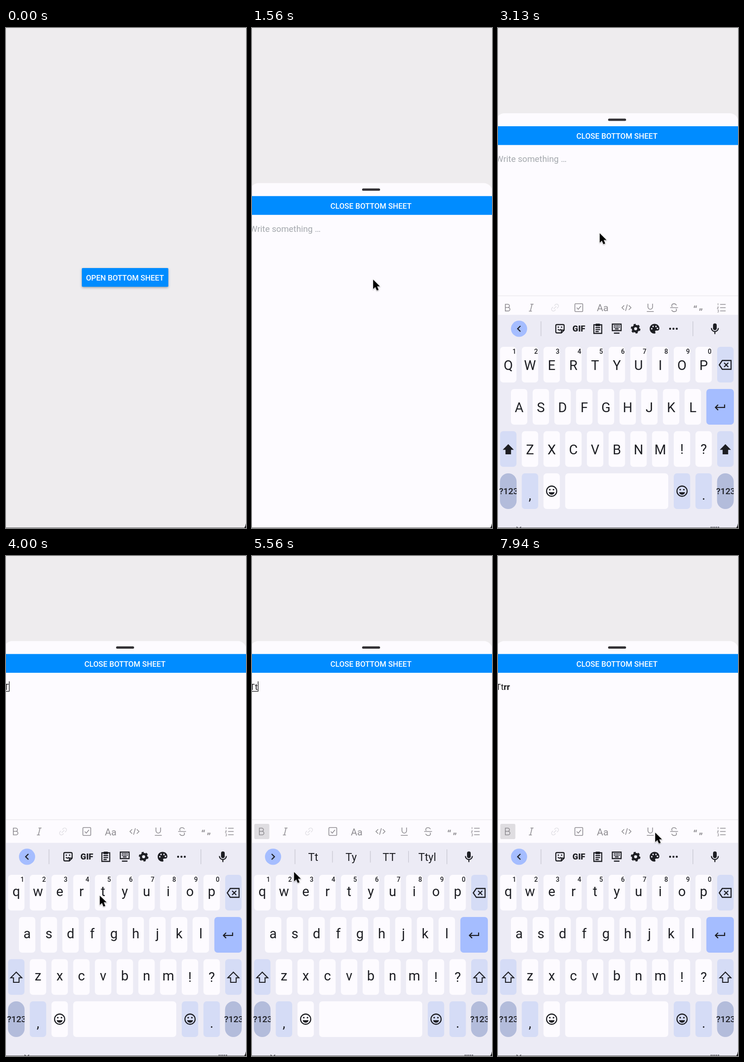
Recreate the animation shown at these times as an HTML page. Size 519 by 1079 pixels, loop 8000 ms.

```html
<!DOCTYPE html>
<html lang="en">
<head>
<meta charset="utf-8">
<title>Bottom sheet editor</title>
<style>
  html, body { margin: 0; width: 100%; height: 100%; overflow: hidden; background: #eeecee; }
  svg { display: block; width: 519px; height: 1079px; font-family: Roboto, sans-serif; }
  .mid { text-anchor: middle; }
  .btn { font-size: 16.5px; font-weight: 500; fill: #fff; }
  .body { font-size: 18.7px; fill: #1b1b1d; }
  .key { font-size: 29px; }
  .hint { font-size: 14px; font-weight: 500; }
  .word { font-size: 23.5px; }
  .line { fill: none; stroke: currentColor; }
  #open { filter: drop-shadow(0 2.5px 2.5px rgba(0, 0, 0, .3)); }
  #cursor { filter: drop-shadow(0 1.5px 1.2px rgba(0, 0, 0, .35)); }
  #tools { color: #8e8c91; fill: #8e8c91; stroke-width: 1.6; }
  #keyboard { color: #1d1e23; fill: #1d1e23; stroke-width: 2.3; }
</style>
</head>
<body>
<svg viewBox="0 0 519 1079">
  <rect width="519" height="1079" fill="#eeecee"/>
  <rect id="open" x="164" y="518" width="187" height="40.5" rx="2" fill="#008cff"/>
  <text class="btn mid" x="257.3" y="545">OPEN BOTTOM SHEET</text>

  <g id="sheet">
    <rect x="-5" width="525" height="1100" rx="19" fill="#fdfbff"/>
    <rect x="238" y="11.5" width="39" height="5" rx="2.5" fill="#343236"/>
    <rect x="-5" y="28" width="525" height="40.5" rx="2" fill="#008cff"/>
    <text class="btn mid" x="257.3" y="55">CLOSE BOTTOM SHEET</text>
    <text id="hint" class="body" x="-5" y="105" style="fill:#a5a9ae">Write something …</text>
    <text class="body" x="-5" y="105"><tspan id="plain"></tspan><tspan id="bold" font-weight="700"></tspan></text>
    <rect id="under" x="-5" y="108" height="1.3" fill="#1b1b1d"/>
    <rect id="caret" y="87" width="1.4" height="22" fill="#1b1b1d"/>
  </g>

  <g id="tools"></g>
  <g id="keyboard"></g>

  <rect y="1078" width="519" height="1" fill="#5c5b5e"/>
  <path d="M519 1069q-1 6-4 10h4z" fill="#1c1b1d"/>
  <path id="cursor" d="M0 0V20.2L4.6 15.9 8 23.6 11.8 22 8.5 14.4H14.6Z" fill="#000" stroke="#fff" stroke-width="1.5" paint-order="stroke"/>
</svg>

<script>
const $ = id => document.getElementById(id);
const LOOP = 8000;

// Markup helpers
const at = (x, y, inner, id = '') => `<g id="${id}" transform="translate(${x} ${y})">${inner}</g>`;
const line = (d, extra = '') => `<path class="line" d="${d}" ${extra}/>`;
const box = (x, y, w, h, r, fill) => `<rect x="${x}" y="${y}" width="${w}" height="${h}" rx="${r}" fill="${fill}"/>`;
const dot = (x, y, r, extra = '') => `<circle cx="${x}" cy="${y}" r="${r}" ${extra}/>`;
const text = (x, y, s, cls) => `<text class="${cls}" x="${x}" y="${y}">${s}</text>`;

function buildTools() {
  const icons = [
    line('M-4.5-7.2H1a3.5 3.5 0 0 1 0 7H-4.5zM-4.5-.2H1.8a3.7 3.7 0 0 1 0 7.4H-4.5z'),
    line('M-1.5-7.5h6.5M-5 7.5h6.5M1.9-7.5l-3.7 15'),
    `<g style="color:#e2e1e6" transform="rotate(-45)">${line('M-2-4h-3a4 4 0 0 0 0 8h3M2-4h3a4 4 0 0 1 0 8h-3M-4 0h8')}</g>`,
    line('M-7-8.5H7q1.5 0 1.5 1.5V7q0 1.5-1.5 1.5H-7q-1.5 0-1.5-1.5V-7q0-1.5 1.5-1.5zM-4.5 0l3.2 3.5 6-7'),
    '<text class="mid" y="8" font-size="21">Aa</text>',
    line('M-5-4.8l-4.8 4.8 4.8 4.8M5-4.8l4.8 4.8-4.8 4.8M2-7l-4 14'),
    line('M-5-8.5v7a5 5 0 0 0 10 0v-7M-7.5 8.3h15'),
    line('M5-5c-1-2.5-3-3.3-5-3.3-3 0-5 1.6-5 4q0 1.6 1 2.6M-8.5 0h17M4 2.5q1.2 1.1 1.2 2.6c0 2.2-2 3.6-5 3.6-2.5 0-4.6-1.2-5.4-3.6'),
    '<g font-size="22" font-weight="500"><text x="-10" y="13">“</text><text x="2" y="18">”</text></g>',
    line('M-3.5-7H8.5M-3.5 0H8.5M-3.5 7H8.5') +
      line('M-8-9.5v4.5M-9.5-1.5h2.5l-2.5 3.5h2.5M-9.5 5h2.5v4.5h-2.5', 'stroke-width="1.1"')
  ];
  return box(0, 569, 519, 60, 0, '#fdfbff') + box(0, 568.5, 519, 1, 0, '#e3e1e6') +
    `<g id="boldOn">${box(5, 578, 32.5, 33, 3, '#dfdde1')}</g>` +
    icons.map((icon, i) => at(20.3 + 51.5 * i, 594.5, icon)).join('');
}

function buildKeyboard() {
  const white = '#fdfbff', pale = '#d5dcf6', blue = '#a5bdff', gray = '#b3bcdb';
  const pitch = 46.95, rows = [688, 779, 870, 961];
  const col = i => 22.2 + pitch * i;
  const key = (x, row, fill, w = 35.5, r = 7) => box(x - w / 2, rows[row], w, 77, r, fill);
  const split = (x, h) => box(x - .6, 649 - h / 2, 1.2, h, 0, '#c3c3ce');
  let out = box(0, 619, 519, 460, 0, '#ecebf5'), upper = '', lower = '';

  ['qwertyuiop', 'asdfghjkl', 'zxcvbnm'].forEach((letters, row) => {
    [...letters].forEach((c, i) => {
      const x = col(i + [0, .5, 1][row]), y = rows[row];
      out += key(x, row, white);
      upper += text(x, y + 49.5, c.toUpperCase(), 'key mid');
      lower += text(x, y + 45.5, c, 'key mid');
      if (!row) out += text(x + 13, y + 14.5, (i + 1) % 10, 'hint mid');
    });
  });

  const arrow = 'M0-11L12 1.2H6V11H-6V1.2H-12z';
  [0, 10].forEach(i => {
    out += key(col(i), 2, pale) + key(col(i), 3, gray, 36, 18);
    upper += at(col(i), 909, `<path d="${arrow}"/>`);
    lower += at(col(i), 909, line(arrow, 'stroke-width="2.1"'));
    // Wide label cropped by its key
    out += `<svg x="${col(i) - 21}" y="961" width="39" height="77" overflow="hidden"><text x="1" y="45" font-size="19" font-weight="500">?123</text></svg>`;
  });
  out += `<g id="upper">${upper}</g><g id="lower">${lower}</g>`;

  out += key(col(8), 2, white) + text(col(8), 919, '!', 'key mid') +
    key(col(9), 2, white) + text(col(9), 919, '?', 'key mid') +
    key(col(10), 0, pale) + at(491.5, 727, line('M-6.5-9.5H12.5V9.5H-6.5L-13-.0zM-2.5-4.5l9 9M6.5-4.5l-9 9')) +
    key(480.3, 1, blue, 59.5) + at(480, 818, line('M10-5.5V.8H-9.5M-4-5L-9.8.8-4 6.6'));

  const smiley = dot(0, 0, 11, 'class="line"') + dot(-4, -3.2, 1.7) + dot(4, -3.2, 1.7) + '<path d="M-6.3 2.2H6.3A6.3 5.5 0 0 1-6.3 2.2z"/>';
  out += key(col(1), 3, pale) + text(col(1), 1018, ',', 'key mid') +
    key(col(2), 3, white) + at(116, 999.5, smiley) + key(256.7, 3, white, 223) +
    key(col(8), 3, pale) + at(398, 999.5, smiley) +
    key(col(9), 3, pale) + text(col(9), 1018, '.', 'key mid');

  // Strip above the keys
  const strip = [
    line('M-6.5-9H6.5Q9-9 9-6.5V3L3 9H-6.5Q-9 9-9 6.5V-6.5Q-9-9-6.5-9zM8.5 3H3V8.5M-4.5 1q3.5 4 7 0') + dot(-3.5, -3.5, 1.5) + dot(3.5, -3.5, 1.5),
    '<text class="mid" y="6.3" font-size="18" font-weight="800">GIF</text>',
    line('M-8.5-8.5H8.5V10H-8.5zM-5-2.5H5M-5 1.8H5M-5 6H2') + box(-5, -11, 10, 5.5, 1.5, '#1d1e23'),
    line('M-9.5-10H9.5V4H-9.5zM-6 9.5H6M-4 .3H4') + line('M-6-6.5H6.5M-6-3H6.5', 'stroke-dasharray="2.2 1.3"'),
    dot(0, 0, 5.8, 'class="line" stroke-width="5"') + dot(0, 0, 8.7, 'class="line" stroke-width="3.4" stroke-dasharray="4.55 4.56"'),
    '<path d="M0-10.5C-6-10.5-10.5-6-10.5 0S-6 10.5 0 10.5c2 0 2.6-1.8 1.6-3.2C.6 5.6 1.5 4 3.4 4H6c2.6 0 4.5-2 4.5-4.8C10.500-6.500 6-10.500 0-10.500z"/>' +
      [[-6, 0], [-3.2, -5], [3.2, -5], [6.3, -.8]].map(p => dot(...p, 1.7, 'fill="#ecebf5"')).join(''),
    [-7.2, 0, 7.2].map(x => dot(x, 0, 2.2)).join('')
  ];
  const words = ['Tt', 'Ty', 'TT', 'Ttyl'];
  out += dot(45.5, 649, 17.5, `fill="${blue}"`) + split(93, 32) + split(421.5, 32) +
    `<g id="strip">${line('M48.500 643l-6 6 6 6')}${strip.map((s, i) => at(134 + 40.9 * i, 649, s)).join('')}</g>` +
    `<g id="words">${line('M42.500 643l6 6-6 6')}${words.map((w, i) => text(132.3 + 82.2 * i, 657.5, w, 'word mid')).join('')}` +
    [174, 256, 338.5].map(x => split(x, 25)).join('') + '</g>' +
    at(469, 649, box(-4, -11.5, 8, 14.5, 4, '#1d1e23') + line('M-7.5-1.500a7.500 7.500 0 0 0 15 0M0 6v5.500'));

  // Navigation row peeking in at the bottom edge
  return out + line('M40 1076.500l3 2M50 1076.500l-3 2', 'stroke-width="1.2"') +
    line('M460 1077H478', 'stroke-width="1.6" stroke-dasharray="2 2"');
}

$('tools').innerHTML = buildTools();
$('keyboard').innerHTML = buildKeyboard();

// Pointer stops: time, x, y
const pointer = [
  [380, 445, 721], [560, 445, 721], [1200, 262, 543], [1700, 262, 543],
  [2130, 228, 465], [2650, 220, 443], [3200, 220, 443], [3850, 203, 733],
  [4560, 202, 732], [5150, 25, 594], [5380, 25, 594], [5560, 91, 682],
  [5900, 166, 735], [6350, 166, 735], [6810, 266, 625], [7500, 340, 597]
];
// Typing: time, plain text, bold text
const typing = [[0, '', ''], [4000, 'T', ''], [4420, 'Tt', ''], [6030, 'Tt', 'r'], [6290, 'Tt', 'rr']];
const ends = { T: 6.4, Tt: 12.6, Ttr: 19.4, Ttrr: 26.2 };

const part = (t, from, ms) => Math.min(1, Math.max(0, (t - from) / ms));
const outExpo = p => p >= 1 ? 1 : 1 - 2 ** (-10 * p);
const smooth = p => p * p * (3 - 2 * p);
const show = (id, on) => $(id).setAttribute('visibility', on ? 'visible' : 'hidden');
const move = (id, x, y) => $(id).setAttribute('transform', `translate(${x} ${y})`);

function pointerAt(t) {
  const i = pointer.findLastIndex(k => k[0] <= t);
  const a = pointer[Math.max(0, i)], b = pointer[i + 1] || a;
  const p = a === b ? 0 : smooth(part(t, a[0], b[0] - a[0]));
  return [a[1] + (b[1] - a[1]) * p, a[2] + (b[2] - a[2]) * p];
}

function draw(t) {
  move('sheet', 0, 1079 - 757 * outExpo(part(t, 1380, 307)) - 138.5 * outExpo(part(t, 2930, 250)));
  show('sheet', t >= 1380);
  move('keyboard', 0, 460 * (1 - outExpo(part(t, 2930, 190))));
  move('tools', 0, 50 * (1 - part(t, 3030, 123)));
  show('tools', t >= 3030);

  const [typed, plain, bold] = typing.findLast(k => k[0] <= t);
  const end = ends[plain + bold] || 0;
  $('plain').textContent = plain;
  $('bold').textContent = bold;
  show('hint', t >= 1380 && !plain);
  show('under', plain && !bold);
  $('under').setAttribute('width', end + 5);
  $('caret').setAttribute('x', end);
  show('caret', plain && (t - typed) % 1000 < 500);

  show('upper', t < 4000);
  show('lower', t >= 4000);
  const suggest = t >= 4420 && t < 6030;
  show('words', suggest);
  show('strip', !suggest);
  show('boldOn', t >= 5300);

  move('cursor', ...pointerAt(t));
  show('cursor', t >= 380);
}

const start = performance.now();
function tick() {
  draw((performance.now() - start) % LOOP);
  requestAnimationFrame(tick);
}
tick();
</script>
</body>
</html>
```
